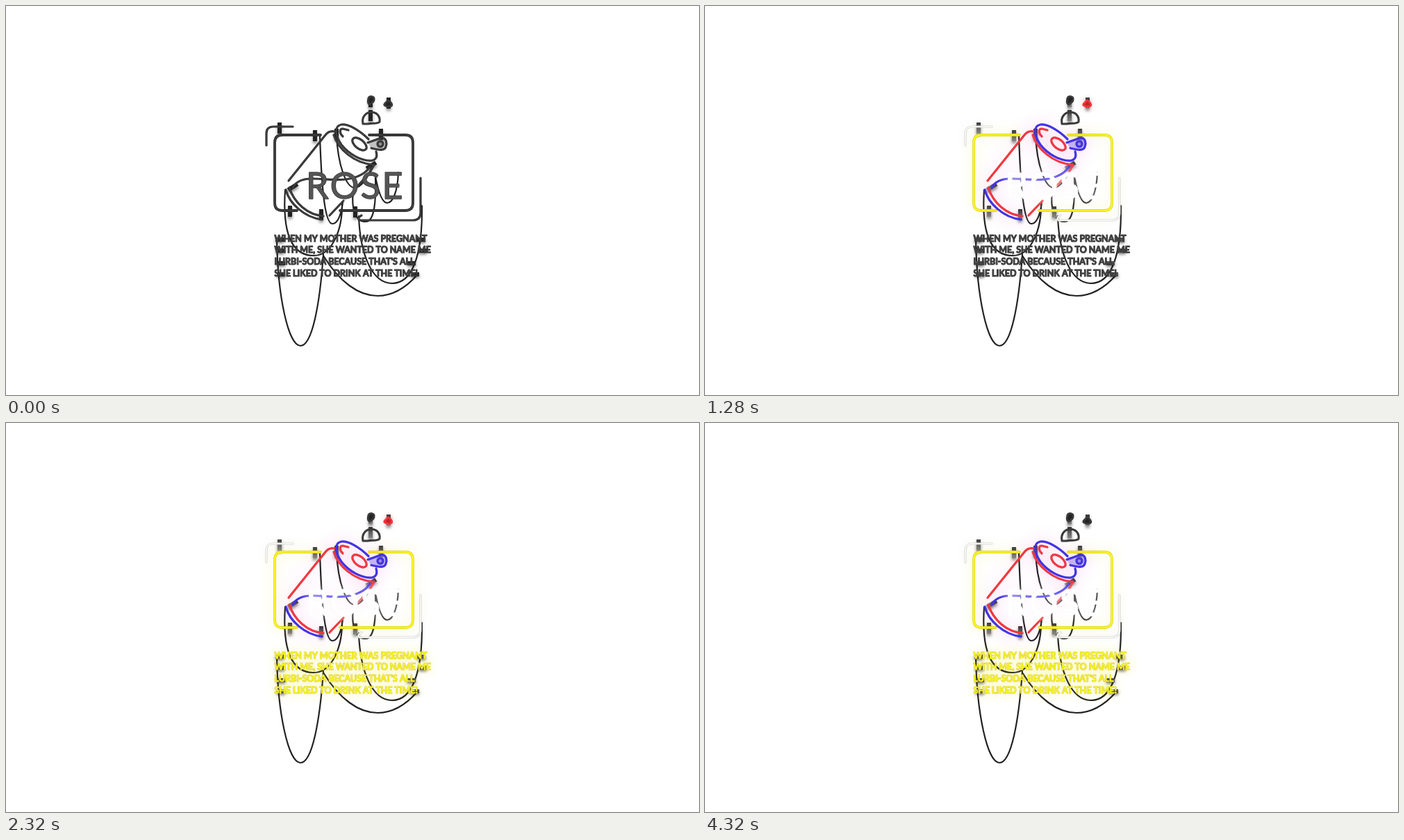
Write an HTML page with a canvas that moves like this. It is 998 by 561 pixels and loops after 4.36 s.

```html
<!DOCTYPE html>
<html lang="en">
<head>
<meta charset="utf-8">
<title>Neon sign</title>
<style>
  html, body { margin: 0; width: 100%; height: 100%; overflow: hidden; background: #fff; }
  canvas { display: block; width: 998px; height: 561px; }
</style>
</head>
<body>
<canvas id="stage" width="998" height="561"></canvas>
<script>
const ctx = document.getElementById('stage').getContext('2d');
const LOOP = 4360, STEP = 40;

const DARK = [46, 46, 46];
const RED = [238, 46, 54];
const BLUE = [58, 44, 222];
const YELLOW = [228, 220, 24];
const WHITE = [214, 214, 214];
const PINK = [226, 70, 190];

const cables = new Path2D(
  'M390 335 C391 420 407 490 424 490 C441 490 452 430 457 358' +
  'M402 265 C398 325 410 360 443 360 C470 360 485 322 484 283' +
  'M452 187 C454 250 458 314 470 314 C478 314 483 300 485 283' +
  'M476 186 C478 230 490 262 502 262 C512 262 522 246 527 232' +
  'M500 268 C497 292 503 311 518 311 C531 311 533 280 532 246' +
  'M532 246 C537 272 543 284 549 284 C557 284 564 268 565 240' +
  'M508 303 C510 360 528 400 556 400 C585 400 600 360 599 288' +
  'M457 360 C480 398 508 418 535 418 C557 418 577 405 592 388');

const frame = new Path2D(
  'M453 186 H398 Q387 186 387 197 V284 Q387 295 398 295 H419' +
  'M523 186 H575 Q586 186 586 197 V284 Q586 295 575 295 H481');

const corners = new Path2D(
  'M375 201 V184 Q375 174 385 174 H413' +
  'M597 248 V298 Q597 309 586 309 H509 Q505 306 512 302');

const ring = new Path2D();
ring.ellipse(509, 199, 12, 6.5, 0.68, 0, 7);

const canRed = new Path2D(
  'M407 252 L460 186 Q465 179 474 181' +
  'M472 186 C478 205 500 227 530 229' +
  'M466 302 L486 281 M507 259 L515 250 M524 240 L530 229' +
  'M485 188 C480 183 480 177 485 177 L493 179' +
  'M408 262 C415 284 434 301 457 303');
canRed.addPath(ring);

const tab = new Path2D('M521 197 L541 190 C548 190 549 198 547 203 C545 209 538 208 526 205');
const rivet = new Path2D();
rivet.arc(539, 199, 4, 0, 7);

const canBlue = new Path2D(
  'M522 192 C510 180 494 170 483 171 C472 173 474 187 483 200' +
  'C494 214 512 224 527 223 C534 221 535 216 533 210' +
  'M403 265 C408 285 430 305 455 308' +
  'M413 262 C418 252 428 249 441 249 C460 249 475 253 495 249 C510 246 519 240 524 232');
canBlue.addPath(tab);
canBlue.addPath(rivet);

// on, full, fade, off for each flash
const drops = [
  { path: new Path2D('M514 170 C512 160 518 153 527 153 C536 154 539 161 538 167 C534 171 528 168 521 170 Z'),
    flashes: [[160, 280, 400, 520], [1520, 1640, 1800, 1960], [2920, 3080, 3320, 3480]], glow: 26 },
  { path: new Path2D('M522 133 C524 129 531 130 530 135 C530 139 526 140 524 142 C521 141 521 137 522 133 Z'),
    flashes: [[360, 440, 600, 760], [1740, 1860, 2040, 2240], [3260, 3380, 3560, 3760]], glow: 8, fill: true },
  { path: new Path2D('M545 143 C544 140 548 140 550 136 C554 138 557 142 555 144 C552 146 547 145 545 143 Z'),
    flashes: [[440, 600, 1300, 1420], [1800, 1960, 2500, 2760], [3400, 3520, 4000, 4280]], glow: 8, fill: true }
];

const brackets = [
  [394, 176], [445, 187], [540, 185], [409, 296], [454, 301], [503, 297],
  [476, 185], [525, 158], [525, 138], [551, 140], [413, 261, 1], [526, 230, 1]
];
const clips = [
  [394, 337], [395, 353], [396, 371], [396, 387],
  [598, 337], [600, 353], [584, 371], [589, 387]
];

const lines = [
  'WHEN MY MOTHER WAS PREGNANT',
  'WITH ME, SHE WANTED TO NAME ME',
  'LURBI-SODA BECAUSE THAT\'S ALL',
  'SHE LIKED TO DRINK AT THE TIME!'
];

const ramp = (t, a, b) => Math.min(1, Math.max(0, (t - a) / (b - a)));
const pulse = (t, [on, full, fade, off]) => ramp(t, on, full) * (1 - ramp(t, fade, off));
const mix = (a, b, k) => a.map((v, i) => v + (b[i] - v) * k);
const css = (c, alpha = 1) => `rgba(${c.map(Math.round).join()},${alpha})`;

function setGlow(color, blur, alpha) {
  ctx.shadowColor = css(color, alpha);
  ctx.shadowBlur = alpha > 0 ? blur : 0;
}

function tube(path, color, level, width, blur, core, halo = color) {
  ctx.save();
  ctx.lineWidth = width;
  ctx.strokeStyle = css(mix(DARK, color, level));
  setGlow(halo, blur, 0.3 * level);
  ctx.stroke(path);
  ctx.shadowColor = 'transparent';
  ctx.lineWidth = width * 0.45;
  ctx.strokeStyle = css(mix([64, 64, 64], core, level));
  ctx.stroke(path);
  ctx.restore();
}

function bracket([x, y, tilted], lit) {
  ctx.save();
  ctx.translate(x, y);
  if (tilted) ctx.rotate(1);
  const shade = ctx.createLinearGradient(0, -8, 0, 8);
  shade.addColorStop(0, css(mix([34, 34, 34], [52, 54, 56], lit)));
  shade.addColorStop(1, css(mix([34, 34, 34], [135, 135, 135], lit)));
  ctx.shadowColor = 'rgba(0,0,0,.5)';
  ctx.shadowBlur = 4;
  ctx.shadowOffsetY = 3;
  ctx.fillStyle = shade;
  ctx.fillRect(-3, -8, 6, 16);
  ctx.restore();
}

function clip([x, y], lit) {
  ctx.save();
  ctx.shadowColor = 'rgba(0,0,0,.55)';
  ctx.shadowBlur = 4;
  ctx.shadowOffsetY = 2;
  ctx.fillStyle = css(mix([40, 40, 40], [78, 80, 80], lit));
  ctx.fillRect(x - 6, y - 3, 12, 6);
  ctx.restore();
}

function story(level) {
  ctx.save();
  ctx.font = '700 12.45px Lato, sans-serif';
  ctx.lineWidth = 1.1;
  ctx.fillStyle = css(mix([66, 66, 66], [248, 241, 48], level));
  ctx.strokeStyle = css(mix([52, 52, 52], [218, 210, 34], level));
  lines.forEach((line, i) => {
    const y = 339.6 + i * 16.8;
    setGlow(YELLOW, 18, 0.4 * level);
    ctx.strokeText(line, 386.5, y);
    ctx.shadowColor = 'transparent';
    ctx.fillText(line, 386.5, y);
  });
  ctx.restore();
}

function title(level) {
  ctx.save();
  ctx.font = '400 52px Lato, sans-serif';
  ctx.letterSpacing = '2.5px';
  ctx.lineWidth = 1.4;
  ctx.strokeStyle = css(mix([56, 56, 56], [250, 250, 250], level));
  ctx.fillStyle = css(mix([84, 84, 84], [255, 255, 255], level));
  setGlow([255, 255, 255], 14, 0.8 * level);
  ctx.strokeText('ROSE', 432, 278);
  ctx.fillText('ROSE', 432, 278);
  ctx.restore();
}

function drop({ path, flashes, glow, fill }, t) {
  const level = Math.max(...flashes.map(f => pulse(t, f)));
  if (fill) {
    ctx.fillStyle = css(mix([36, 36, 36], [190, 34, 40], level));
    ctx.fill(path);
  }
  tube(path, RED, level, 3, glow, [245, 56, 64]);
}

function draw(t) {
  const white = ramp(t, 240, 400);
  const yellow = ramp(t, 480, 640);
  const red = ramp(t, 680, 840);
  const blue = ramp(t, 800, 960);
  const name = ramp(t, 960, 1120);
  const lit = ramp(t, 600, 1100);

  ctx.fillStyle = '#fff';
  ctx.fillRect(0, 0, 998, 561);
  ctx.lineCap = ctx.lineJoin = 'round';

  ctx.lineWidth = 2.2;
  ctx.strokeStyle = '#222';
  ctx.stroke(cables);

  brackets.forEach(b => bracket(b, lit));
  clips.forEach(c => clip(c, lit));

  tube(corners, WHITE, white, 3.2, 14, [255, 255, 255]);
  tube(frame, YELLOW, yellow, 3.8, 20, [255, 250, 44]);
  tube(canRed, RED, red, 3.2, 24, [246, 60, 66], PINK);

  // the tab's tubes sit close enough to tint the space between them
  ctx.fillStyle = css(mix(DARK, BLUE, blue), 0.3);
  ctx.fill(tab);
  ctx.fill(rivet);
  tube(canBlue, BLUE, blue, 3.2, 24, [70, 54, 236], PINK);

  title(name);
  story(ramp(t, 1760, 2000));
  drops.forEach(d => drop(d, t));
}

let start;
function tick(now) {
  start ??= now;
  draw(Math.floor(((now - start) % LOOP) / STEP) * STEP);
  requestAnimationFrame(tick);
}
requestAnimationFrame(tick);
</script>
</body>
</html>
```
